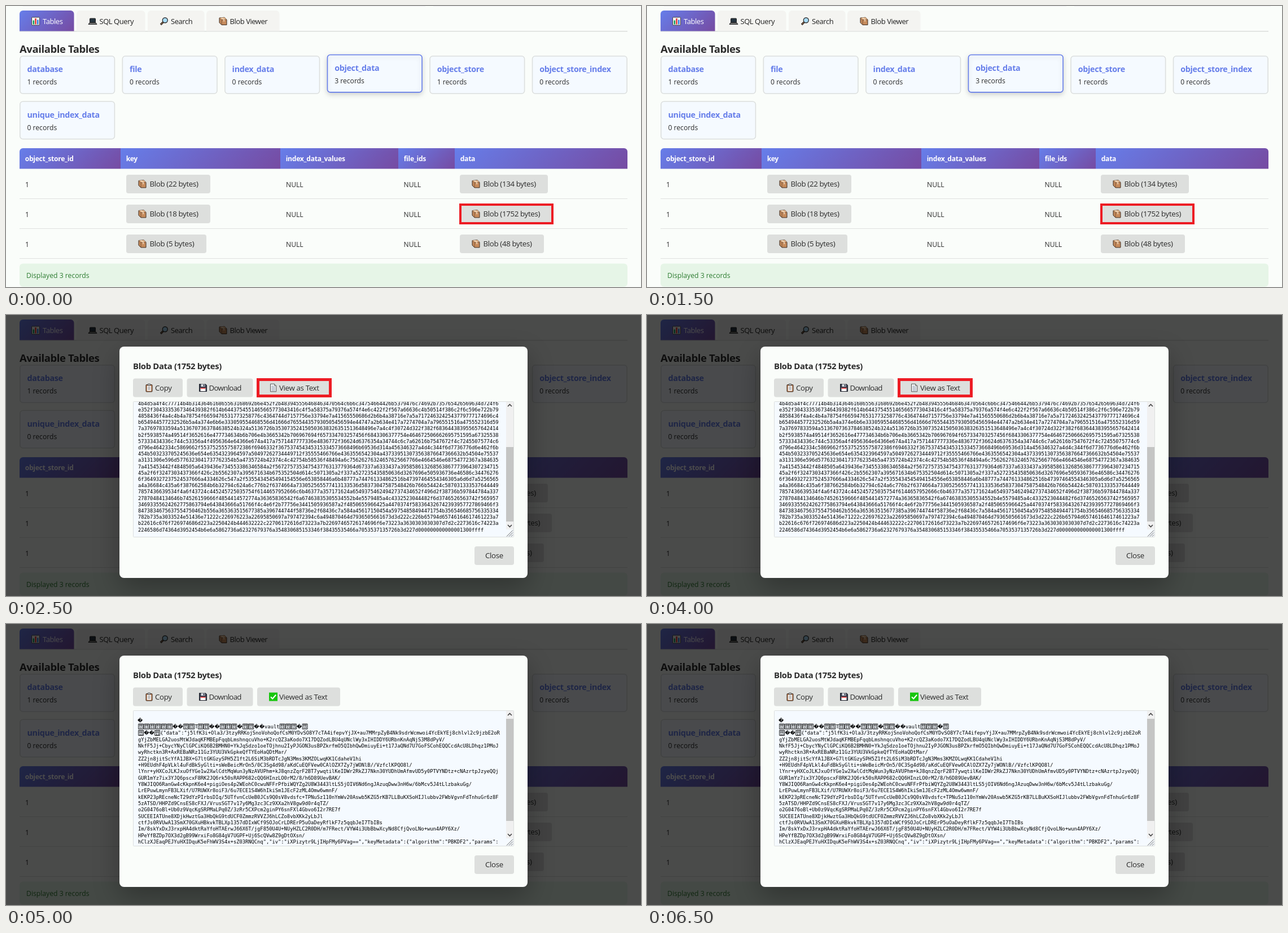
An HTML page with a canvas that plays this animation: 1125x498 px, repeating every 7500 ms.

```html
<!DOCTYPE html>
<html lang="en">
<head>
<meta charset="utf-8">
<title>Table browser</title>
<style>
html, body { margin: 0; width: 100%; height: 100%; overflow: hidden; background: #fafdfa; }
canvas { display: block; }
</style>
</head>
<body>
<canvas id="stage" width="1125" height="498"></canvas>
<script>
const ctx = document.getElementById('stage').getContext('2d');
const SANS = '"Open Sans", "Noto Sans", sans-serif';
const MONO = '"DejaVu Sans Mono", monospace';
const PAGE = '#fafdfa', INK = '#2b2b2b', BLUE = '#667eea', EDGE = '#dcdfde', GREY = '#dddfdd', RED = '#ed1c24', PANEL = '#f5faff';
const STEP = 2500, LOOP = 3 * STEP;

// Decoded blob by wrapped line; what follows a bar shows only in the hex view
const rows = [
  '{"data":"j5lfK3i+Ola3/3tzyRRKojSnoVohoQofCsM0YDvSO8Y7cTA4ifepvYjJX+au7MMrpZyB4Nk9sdrWcmwoi4YcEkYEj8chlvl2c9jzbE2oR',
  'gYjZbMELGA2uosMtWJdaqKFMBEpFqqbLmshnqcuVho+K2rcQZ3aKodo7X17DQZodLBU4qUNclWy3xIHIDDY6URbnKnAqNjS3M8dPyV/',
  'NkfF5Jj+CbycYNyClGPCiKQ6B2BMHN0+YkJqSdzo1oeTOjhnu2IyPJGON3usBPZkrfmO5QIbhQwDmiuyEi+t17JaQNd7U7GoFSCohEQQCcdAcU8LDhqz1PMoJ',
  'wyRhctkn3R+AxREBaNRz11Gz3YUU3VkGpkeQfTYEoHaQDtMar/',
  'ZZ2jn8jitScYfA1JBX+G7ltGKGzySPH5Z1ft2L6SiM3bRDTcJgN3Mms3KMZOLwqKK1CdaheV1hi|+nE/',
  '+H9EUdhF4pVLkl4uFdBkSyGlti+sWeBeicMrOn5/0C3Sg4d98/aKdCuEQFVew0CAlOZX7Zy7jWONlB//VzfclKPQO8l/',
  'lYnr+yHXCoJLKJxuOfYGe1w2XwlCdtMqWun3yNzAVUPhm+kJ8qnzZqrF2BT7ywqtilKeIDWr2RkZJ7Nkn30YUDhUmAfmvUD5y0PTVYNDtz+cNAzrtpJzyeQQj',
  'GUR1mYz7ix3YJQ6pscxF8RK2JQ6rk50sRAPP682cQQ6HInzLO0rM2/8/h6D89UevBAK/',
  'Y8WJIQO6RanGw4cKkpnK6e4+pigiOes4p2WEohC0cwuNFFrPfbiWQYZg2U8W3443ltLS5jOIV6Nd6ngJAzuqDww3nH6w/6bMcv5J4tLlzbakuGg/',
  'LrEPuwLmynFB3LXif/U7RUWXr8oiF3/6u7ECE1S4W6hIkiSm1JEcF2zML4Omw6wmnF/',
  'kEKP23pREcneNcT29dYzPIrbsDIq/5UTfvnCcUeB0JCs9Q0sV8vdsfc+TPNuSz110nYmWv20Aswb5KZG5rKB7LLBuKXSoHIJlubbv2FWbVgvnFdTnhuGr6z8F',
  '5zATSD/HHPZd9CnsES8cFXJ/VrusSGT7v17y6Mg3zc3Cz9XXa2hV8gw9d0r4qTZ/',
  'o2G0476oBl+Ub0z9VqcKgSRPMaLPq0Z/3zRr5CXPcm2ginPY6snFXl4Gbvo6I2r7RE7f|jC4blTz/',
  'SUCEEIATUne8XDjkHwztGa3HbQkG9tdUCF0ZmmzRVVZJ6hLCZo8vbXKk2yLbJl|wk/',
  'ctfJs0RVUwA13SmX70GXuHBkvkTBLXp1357dDIxWCf9SOJoCrLDRErP5uOaDeyRflkF7z5qqbJeI7TbIBs|t4e/',
  'Im/8skYxDxJ3rxpHA4dktRaYfoHTAErwJ66X6T/jgF850U4U+NUyHZLC2R0DH/m7FRect/VYW4i3UbBbwXcyNd8CfjQvoLNo+wun4APY6Xz/',
  'HPeYfBZDp7OX3d2gB99WrxiFo8G84gV7UGPF+Uj6ScQVw8Z9gDtOXsn/',
  'hClzXJEaqPEJYuHXIDquK5eFhWV3S4x+sZ03RNQCnq","iv":"iXPizytr9LjIHpFMy6PVag==","keyMetadata":{"algorithm":"PBKDF2","params":'
];
const tail = '{"iterations":600000}},"salt":"FXmt6M9REKnjXbsjb2vy7j5H0hQS4o8CU5FjpSSq5rk="}';
const HEX_COLS = 121, HEX_ROWS = 21, HEX_LAST = 116;
const plain = rows.join('').replaceAll('|', '') + tail;
const hex = ([...plain].map(c => c.charCodeAt(0).toString(16)).join('') + '000000000000001300ffff')
  .slice(-((HEX_ROWS - 1) * HEX_COLS + HEX_LAST));

function text(s, x, y, size, color = INK, weight = 400, gap = 0, family = SANS) {
  ctx.font = `${weight} ${size}px ${family}`;
  ctx.letterSpacing = gap + 'px';
  ctx.fillStyle = color;
  ctx.fillText(s, x, y);
}

function bold(s, x, y, size, color = INK) {
  text(s, x, y, size, color, 700, -.022 * size);
}

function rect(x, y, w, h, color) {
  ctx.fillStyle = color;
  ctx.fillRect(x, y, w, h);
}

function round(x, y, w, h, r, fill, stroke, line = 1) {
  ctx.beginPath();
  ctx.roundRect(x, y, w, h, r);
  if (fill) { ctx.fillStyle = fill; ctx.fill(); }
  if (stroke) { ctx.strokeStyle = stroke; ctx.lineWidth = line; ctx.stroke(); }
}

function path(points, fill, stroke, line = 1) {
  ctx.beginPath();
  for (let i = 0; i < points.length; i += 2) ctx.lineTo(points[i], points[i + 1]);
  if (fill) { ctx.closePath(); ctx.fillStyle = fill; ctx.fill(); }
  if (stroke) { ctx.strokeStyle = stroke; ctx.lineWidth = line; ctx.stroke(); }
}

function shadow(blur, dy, color) {
  ctx.shadowBlur = blur;
  ctx.shadowOffsetY = dy;
  ctx.shadowColor = color;
}

// Diagonal gradient as in CSS 135deg
function violet(x, y, w, h) {
  const cx = x + w / 2, cy = y + h / 2, d = (w + h) / 4;
  const g = ctx.createLinearGradient(cx - d, cy - d, cx + d, cy + d);
  g.addColorStop(0, BLUE);
  g.addColorStop(1, '#764ba2');
  return g;
}

// Icons fit a box of about 15 by 15
const icons = {
  chart() {
    round(.5, .5, 14, 14, 1, '#f3f3f3', '#444');
    rect(2.5, 6, 2.6, 7, '#16a05d');
    rect(6.2, 2.5, 2.6, 10.5, '#e23b3b');
    rect(10, 5, 2.6, 8, '#2f7fe0');
  },
  laptop() {
    round(2.5, 2.5, 10, 7, 1, '#26343f', '#222');
    path([2, 10, 13, 10, 15, 13, 0, 13], '#777', '#222');
  },
  lens() {
    path([6, 9, 1.5, 13.5], null, '#222', 3.4);
    path([5.4, 9.6, 2, 13], null, '#8a6247', 1.6);
    ctx.beginPath();
    ctx.arc(9.3, 5.7, 4.5, 0, 7);
    ctx.fillStyle = '#a8dcf8';
    ctx.fill();
    ctx.strokeStyle = '#333';
    ctx.lineWidth = 1.4;
    ctx.stroke();
  },
  box() {
    path([1, 1.5, 10, .7, 14, 4.5, 14, 14, 5, 14, 1, 10, 1, 1.5], '#c68b5c', '#3c2d23');
    path([1, 1.5, 10, .7, 14, 4.5, 5, 5], '#e6b88c');
    path([1.5, 2, 5, 5, 14, 4.5], null, '#6a4a34', .8);
    path([5, 5, 5, 14], null, '#6a4a34', .8);
    path([5, 1.2, 9.2, 4.8, 9.2, 8], null, '#f3dcc0', 1.5);
  },
  clip() {
    round(2, 2, 11, 12.5, 1, '#b5764c', '#3a2a20');
    rect(3.8, 4, 7.4, 9, '#fff');
    round(5, .7, 5, 3, 1, '#bbb', '#333', .8);
    for (const y of [6, 8, 10]) rect(5, y, 5, 1, '#888');
  },
  disk() {
    path([1, 1, 12, 1, 14, 3, 14, 14, 1, 14, 1, 1], '#343a4a', '#1d2029');
    rect(4, 1, 7, 4.5, '#d8dde2');
    rect(8, 1.8, 2, 3, '#343a4a');
    rect(3, 7.5, 9, 6, '#fff');
    rect(3, 7.5, 9, 1.6, '#e23b3b');
  },
  page() {
    path([2.5, .7, 9.5, .7, 12.7, 4, 12.7, 14.3, 2.5, 14.3, 2.5, .7], '#f7f7f7', '#555');
    path([9.5, .7, 9.5, 4, 12.7, 4], null, '#555', .8);
    for (let y = 4; y < 13; y += 2) rect(4.3, y, y < 5 ? 4 : 6.6, .9, '#8b9ab0');
  },
  check() {
    rect(0, 0, 15, 15, '#16c60c');
    path([3, 7.8, 6.2, 11, 12.2, 4], null, '#fff', 2);
  }
};

function icon(name, x, y) {
  ctx.save();
  ctx.translate(x, y);
  icons[name]();
  ctx.restore();
}

function button(x, y, w, label, art, gap = -.35) {
  round(x, y, w, 33, 4, GREY);
  if (art) icon(art, x + 21, y + 9);
  text(label, x + (art ? 39 : 19), y + 21.3, 13.3, INK, 400, gap);
}

function blob(x, y, w, size) {
  round(x, y, w, 33, 4, GREY);
  icon('box', x + 21, y + 9);
  text(`Blob (${size} bytes)`, x + 41.5, y + 21.3, 13.3, INK, 400, -.35);
}

function tabs() {
  rect(24, 44, 1077, 1.6, '#dddfdd');
  const list = [
    ['Tables', 'chart', 24, 96.5, 45, 65], ['SQL Query', 'laptop', 125, 121.5, 146, 165.5],
    ['Search', 'lens', 251, 100.5, 272.5, 292], ['Blob Viewer', 'box', 355, 129.5, 377, 396.5]
  ];
  list.forEach(([label, art, x, w, ix, tx], i) => {
    round(x, 8, w, 36.5, [6, 6, 0, 0], i ? '#f4f4f1' : violet(x, 8, w, 36.5));
    icon(art, ix, 19.5);
    text(label, tx, 31.6, 13, i ? '#222' : '#fff', 400, -.45);
  });
}

function cards() {
  const list = [['database', 1], ['file', 0], ['index_data', 0], ['object_data', 3],
    ['object_store', 1], ['object_store_index', 0], ['unique_index_data', 0]];
  list.forEach(([name, n], i) => {
    const on = i === 3;
    const x = 24 + (i % 6) * 181.55, y = 88 + (i > 5 ? 80.5 : 0) - (on ? 2.3 : 0);
    if (on) shadow(9, 3, 'rgba(0,0,0,.16)');
    round(x + .8, y + .8, 167.6, 66.4, 5, PANEL, on ? BLUE : EDGE, 1.6);
    shadow(0, 0, 'transparent');
    bold(name, x + 13.5, y + 29, 14.3, BLUE);
    text(n + ' records', x + 13.5, y + 51, 12.15);
  });
}

function table() {
  const edges = [24, 203, 486, 695, 795, 1101];
  const heads = ['object_store_id', 'key', 'index_data_values', 'file_ids', 'data'];
  heads.forEach((name, i) => {
    const x = edges[i], w = edges[i + 1] - x;
    round(x, 252, w, 36.5, [i ? 0 : 6, i < 4 ? 0 : 6, 0, 0], violet(x, 252, w, 36.5));
    bold(name, x + 9.7, 275.3, 12.1, '#fff');
  });
  const sizes = [[22, 149, 134, 156], [18, 149, 1752, 163], [5, 142, 48, 149]];
  sizes.forEach(([key, kw, data, dw], i) => {
    const y = 299 + i * 53;
    text('1', 34, y + 21.5, 12.15);
    text('NULL', 496, y + 21.5, 12.15);
    text('NULL', 704.5, y + 21.5, 12.15);
    blob(213, y, kw, key);
    blob(804, y, dw, data);
    rect(24, y + 42, 1077, 1, '#dfe1df');
  });
}

function page() {
  rect(0, 0, 1125, 498, PAGE);
  for (const x of [30, 395, 757]) rect(x, 0, 348, 1, '#f0f1f5');
  tabs();
  bold('Available Tables', 24, 82.5, 18.5);
  cards();
  table();
  round(24, 456.5, 1077, 41, 6, '#e6f5e7');
  text('Displayed 3 records', 36, 482, 12.2, '#2e7d32');
}

function redBox(x, y, w, h, line) {
  ctx.strokeStyle = RED;
  ctx.lineWidth = line;
  ctx.strokeRect(x + line / 2, y + line / 2, w - line, h - line);
}

function mono(s, x, y) {
  text(s, x, y, 8.77, '#000', 400, 0, MONO);
}

// b: unprintable code box, ?: replacement mark, others as they are
function codes(s, x, y) {
  for (const c of s) {
    if (c === 'b') {
      round(x + .7, y - 7.8, 8.8, 9, 0, null, '#000', .9);
      for (let k = 0; k < 4; k++) text('0013'[k], x + 2 + (k % 2) * 3.3, y - 3.7 + (k >> 1) * 4.2, 4.8, '#000', 700, 0, MONO);
      x += 10.2;
    } else if (c === '?') {
      text('\uFFFD', x, y, 9, '#000', 400, 0, '"DejaVu Sans", sans-serif');
      x += 9.4;
    } else {
      mono(c, x, y);
      x += 5.28;
    }
  }
  return x;
}

function hexView() {
  for (let i = 0; i < HEX_ROWS; i++) mono(hex.substr(i * HEX_COLS, HEX_COLS), 234, 159.5 + i * 11.2);
}

function textView() {
  const y = i => 173.6 + i * 11.34;
  codes('?', 233, y(0));
  const word = codes('bbbbbb??bbTbb??bbb?bb??', 234, y(1));
  mono('vault', word, y(1));
  codes('bbb?b', word + 26.4, y(1));
  const start = codes('b??b', 234, y(2));
  rows.forEach((row, i) => mono(row.split('|')[0], i ? 234 : start, y(i + 2)));
}

function scrollbar(top, height) {
  rect(886, 154, 13, 226, '#f0f0f0');
  rect(886, top, 13, height, '#c4c5c4');
  path([889, 162, 892.5, 158.5, 896, 162], null, '#444', 1.6);
  path([889, 372, 892.5, 375.5, 896, 372], null, '#444', 1.6);
  for (const d of [0, 4, 8]) path([887 + d, 392.5, 898, 381.5 + d], null, '#666', 1);
}

function modal(decoded) {
  rect(0, 0, 1125, 498, 'rgba(0,0,0,.7)');
  shadow(48, 16, 'rgba(0,0,0,.3)');
  round(201, 56, 723, 410, 8, PAGE);
  shadow(0, 0, 'transparent');
  bold('Blob Data (1752 bytes)', 225, 96.3, 14.85);
  button(225, 112.5, 88, 'Copy', 'clip');
  button(320.5, 112.5, 117, 'Download', 'disk', -.7);
  button(445, 112.5, decoded ? 147 : 131, decoded ? 'Viewed as Text' : 'View as Text', decoded ? 'check' : 'page');
  if (!decoded) redBox(444, 112, 133, 34, 5);
  round(225.5, 153.5, 674, 240, 1, PANEL, EDGE);
  ctx.save();
  ctx.beginPath();
  ctx.rect(226, 154, 660, 239);
  ctx.clip();
  if (decoded) textView(); else hexView();
  ctx.restore();
  if (decoded) scrollbar(168, 181); else scrollbar(234, 132);
  button(830, 410, 70, 'Close');
}

let shown = -1;
function tick() {
  const step = Math.floor((performance.now() % LOOP) / STEP);
  if (step !== shown) {
    shown = step;
    page();
    if (step) modal(step === 2); else redBox(803, 350, 167, 37, 4);
  }
  requestAnimationFrame(tick);
}
tick();
</script>
</body>
</html>
```
